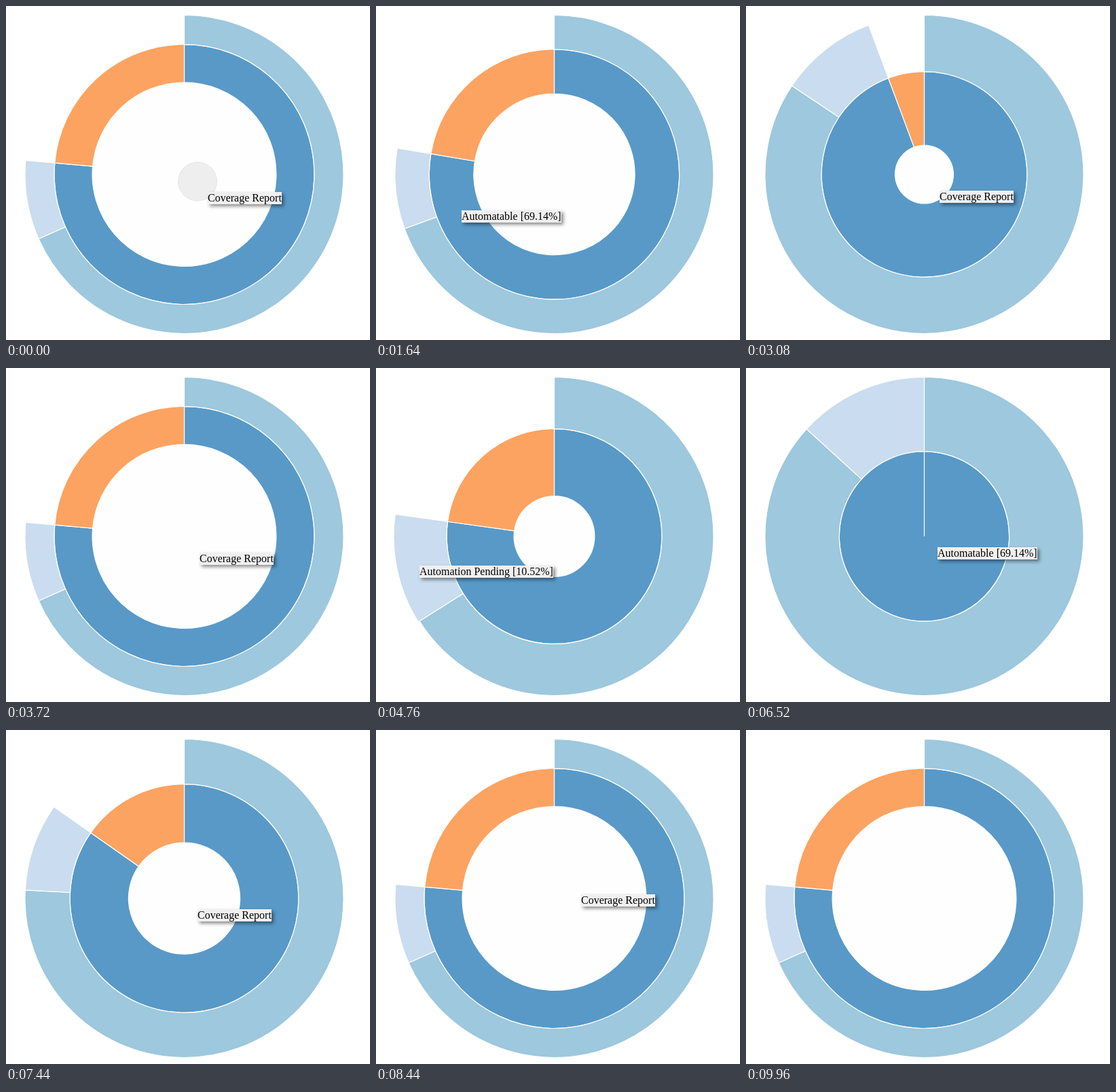
These frames come from a looping animation (536 px wide and 492 px high, 10 s). An HTML page:

```html
<!DOCTYPE html>
<html lang="en">
<head>
<meta charset="utf-8">
<title>Coverage sunburst</title>
<style>
  html, body { margin: 0; width: 100%; height: 100%; overflow: hidden; background: #fff; }
  svg { position: absolute; left: 0; top: 0; display: block; }
  path { stroke: #fff; stroke-width: 1.2; fill-rule: evenodd; }
  #tip {
    position: absolute; left: 0; top: 0; height: 18px;
    font: 16px/18px "Liberation Serif", "Times New Roman", serif;
    color: #000; background: #f0f0f0; white-space: nowrap;
    box-shadow: 3px 3px 5px rgba(0, 0, 0, .45);
  }
</style>
</head>
<body>
<svg width="536" height="492" viewBox="0 0 536 492">
  <g id="chart" transform="translate(262.5 248)"></g>
  <circle id="press" cx="282" cy="258.5" r="28.5" fill="#eeeeee" stroke="#e6e6e6"/>
</svg>
<div id="tip"></div>
<script>
const LOOP = 10000, ZOOM = 750, R = 234.5, HUB = 20, TAU = Math.PI * 2;
const $ = id => document.getElementById(id);

// Partition: x is the share of the circle, y the depth
const auto = 0.764, done = auto * (1 - 0.1052);
const node = (x0, x1, depth, fill) => ({ x0, x1, y0: depth / 3, y1: (depth + 1) / 3, fill });
const root = node(0, 1, 0, "#fefefe");
const blue = node(0, auto, 1, "#5899c8");
const light = node(0, done, 2, "#9dc8dd");
const pending = node(done, auto, 2, "#cadcef");
const orange = node(auto, 1, 1, "#fca361");
const nodes = [root, blue, light, pending, orange];

for (const n of nodes) {
  n.el = document.createElementNS("http://www.w3.org/2000/svg", "path");
  n.el.setAttribute("fill", n.fill);
  $("chart").append(n.el);
}

const zooms = [[1449, blue], [2807, root], [4444, pending], [6060, blue], [7044, root]];

const ROOT = "Coverage Report", AUTO = "Automatable [69.14%]", PEND = "Automation Pending [10.52%]";
// Tooltip stops: time, left, top, text shown from then on
const stops = [
  [0, 297, 274, ROOT], [450, 297, 274, ROOT], [1130, 146, 298, AUTO], [1300, 126, 301, AUTO],
  [2140, 126, 301, AUTO], [2500, 285, 272, ROOT], [4060, 285, 272, ROOT],
  [4140, 143, 284, AUTO], [4220, 86, 290, PEND], [4280, 64, 291, PEND],
  [5940, 64, 291, PEND], [6060, 282, 264, AUTO], [6990, 282, 264, ROOT],
  [8280, 282, 264, ROOT], [9000, 373, 165, AUTO], [9400, 412, 124, ""], [LOOP, 412, 124, ""]
];

const mix = (a, b, k) => a + (b - a) * k;
const clamp = (v, lo, hi) => Math.min(hi, Math.max(lo, v));
const ease = u => u < 0.5 ? 4 * u ** 3 : 1 - 4 * (1 - u) ** 3;

const viewOf = n => [n.x0, n.x1, n.y0, n === root ? 0 : HUB];

function viewAt(t) {
  let view = viewOf(root);
  for (const [start, target] of zooms) {
    const k = ease(clamp((t - start) / ZOOM, 0, 1));
    view = viewOf(target).map((v, i) => mix(view[i], v, k));
  }
  return view;
}

const at = (r, a) => `${(r * Math.sin(a)).toFixed(3)} ${(-r * Math.cos(a)).toFixed(3)}`;
const ring = r => `M0 ${-r}A${r} ${r} 0 1 1 0 ${r}A${r} ${r} 0 1 1 0 ${-r}Z`;

function sector(a0, a1, r0, r1) {
  if (a1 - a0 > TAU - 1e-5) return ring(r1) + (r0 > 0 ? ring(r0) : "");
  const big = a1 - a0 > Math.PI ? 1 : 0;
  return `M${at(r1, a0)}A${r1} ${r1} 0 ${big} 1 ${at(r1, a1)}L${at(r0, a1)}` +
    (r0 > 0 ? `A${r0} ${r0} 0 ${big} 0 ${at(r0, a0)}` : "") + "Z";
}

function drawChart(t) {
  const [x0, x1, y0, hub] = viewAt(t);
  const angle = x => TAU * clamp((x - x0) / (x1 - x0), 0, 1);
  const base = Math.sqrt(y0);
  const radius = y => Math.max(0, hub + (R - hub) * (Math.sqrt(y) - base) / (1 - base));
  const hovered = t >= 4220 && t < 6000;
  for (const n of nodes) {
    const grow = n === pending && hovered ? 2 : 0;
    n.el.setAttribute("d", sector(angle(n.x0), angle(n.x1), radius(n.y0), radius(n.y1) + grow));
  }
}

function drawTip(t) {
  const i = stops.findIndex((s, j) => t >= s[0] && t < stops[j + 1][0]);
  const [t0, ax, ay, text] = stops[i], [t1, bx, by] = stops[i + 1];
  const k = (t - t0) / (t1 - t0), tip = $("tip");
  tip.style.display = text ? "block" : "none";
  tip.style.transform = `translate(${Math.round(mix(ax, bx, k))}px, ${Math.round(mix(ay, by, k))}px)`;
  if (tip.textContent !== text) tip.textContent = text;
}

function draw(t) {
  drawChart(t);
  drawTip(t);
  $("press").setAttribute("opacity", clamp(1 - (t - 40) / 360, 0, 1));
}

const begin = performance.now();
function tick() {
  draw((performance.now() - begin) % LOOP);
  requestAnimationFrame(tick);
}
tick();
</script>
</body>
</html>
```
